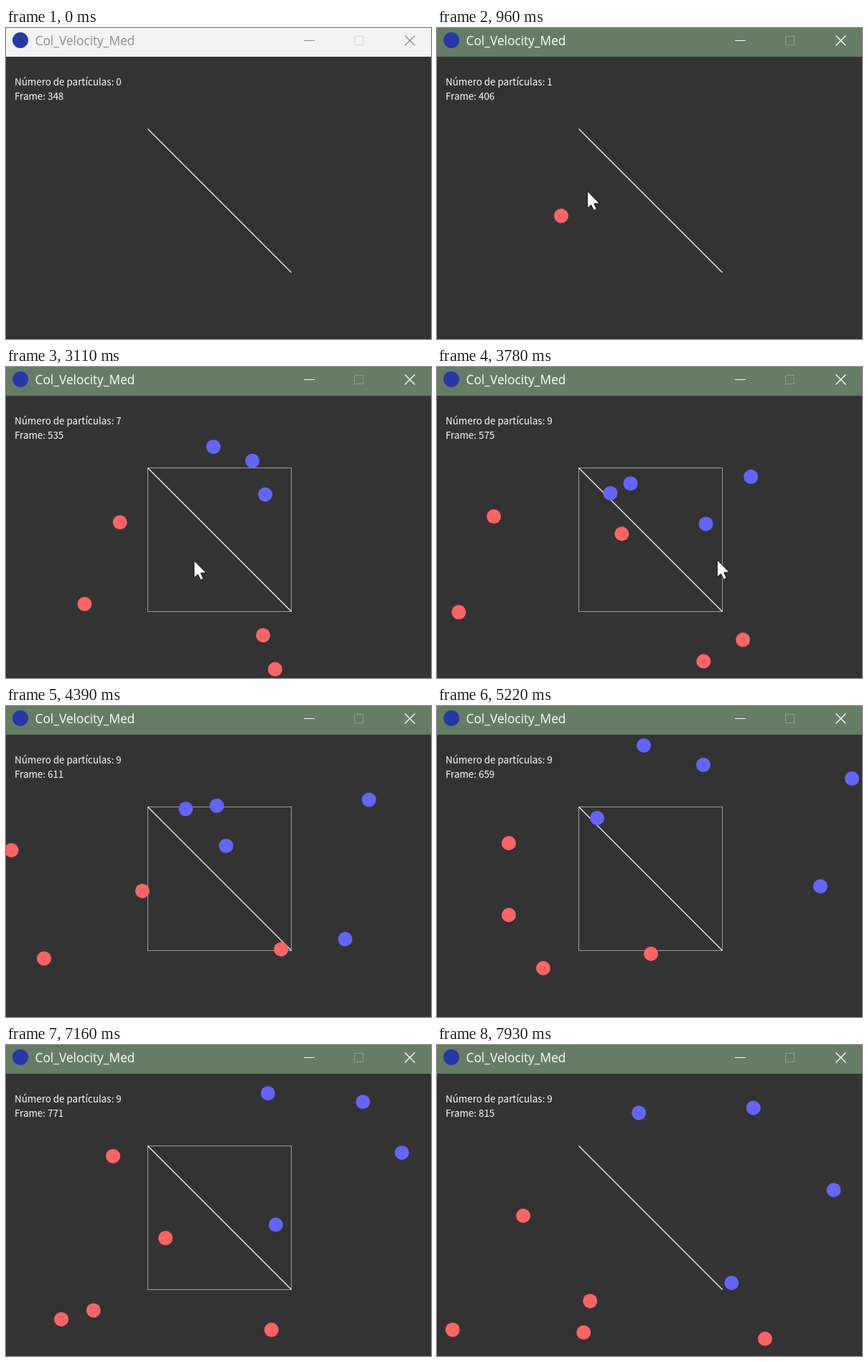
Recreate the animation shown at these times as an HTML page with a canvas. Size 592 by 433 pixels, loop 8000 ms.

```html
<!DOCTYPE html>
<html lang="pt">
<head>
<meta charset="utf-8">
<title>Col_Velocity_Med</title>
<style>
  html, body { margin: 0; width: 100%; height: 100%; overflow: hidden; background: #333; }
  canvas { display: block; }
</style>
</head>
<body>
<canvas id="stage" width="592" height="433"></canvas>
<script>
const ctx = document.getElementById('stage').getContext('2d');
const LOOP = 8000, SPEED = 2, RADIUS = 10, ANCHOR = 659, FOCUS = 390;
const WALL = { left: 6, right: 587.5, top: 49.6, bottom: 431 };
const BAR = { x1: 197.5, y1: 140.5, x2: 397.5, y2: 340.5, offset: 57, skin: 3 };

// Bursts of screen updates: start, end, count
const BURSTS = [
  [70, 800, 11], [880, 1650, 11], [1700, 2470, 12], [2540, 3310, 12], [3380, 4120, 12],
  [4190, 4950, 12], [5010, 5780, 12], [5850, 6610, 12], [6680, 7440, 12], [7510, 7930, 7]
];
// Time in ms against the sketch's frame counter
const CLOCK = [[0, 348], [1910, 464], [3100, 535], [4397, 611], [5220, 659], [6334, 723], [7930, 815]];

// Position and heading at ANCHOR, and the frame of birth
const particles = [
  [298, 345, 2.976, 390],
  [534, 251, -0.874, 408],
  [371, 82, -0.634, 430],
  [578, 101, -2.828, 441],
  [100, 191, -0.102, 475],
  [148, 365, 0.1415, 488],
  [288, 55, -1.168, 520],
  [100, 291, 2.784, 540],
  [223, 156, -1.907, 568]
].map(([x, y, angle, born]) => ({ x, y, angle, born }));

function interpolate(keys, at, ease = u => u) {
  if (at <= keys[0][0]) return keys[0].slice(1);
  for (let i = 1; i < keys.length; i++) {
    const a = keys[i - 1], b = keys[i];
    if (at <= b[0]) {
      const u = ease((at - a[0]) / (b[0] - a[0]));
      return a.slice(1).map((v, j) => v + (b[j + 1] - v) * u);
    }
  }
  return keys[keys.length - 1].slice(1);
}

function lastUpdate(t) {
  let tick = 0;
  for (const [start, end, count] of BURSTS) {
    if (t < start) break;
    const step = (end - start) / (count - 1);
    tick = start + step * Math.min(count - 1, Math.floor((t - start) / step));
  }
  return tick;
}

const gapOf = p => p.x - BAR.offset - p.y;

function advance(p) {
  const before = gapOf(p), side = Math.sign(before);
  p.x += p.vx;
  p.y += p.vy;
  const onBar = p.x > BAR.x1 && p.x < BAR.x2;
  if (onBar && before * side >= BAR.skin && gapOf(p) * side < BAR.skin) {
    const shift = BAR.offset + BAR.skin * side;
    [p.x, p.y] = [p.y + shift, p.x - shift];
    [p.vx, p.vy] = [p.vy, p.vx];
  }
  if (p.x < WALL.left && p.vx < 0) { p.x = 2 * WALL.left - p.x; p.vx *= -1; }
  if (p.x > WALL.right && p.vx > 0) { p.x = 2 * WALL.right - p.x; p.vx *= -1; }
  if (p.y < WALL.top && p.vy < 0) { p.y = 2 * WALL.top - p.y; p.vy *= -1; }
  if (p.y > WALL.bottom && p.vy > 0) { p.y = 2 * WALL.bottom - p.y; p.vy *= -1; }
}

// Runs forwards or backwards from the anchor
function place({ x, y, angle }, frame) {
  const v = frame < ANCHOR ? -SPEED : SPEED;
  const p = { x, y, vx: v * Math.cos(angle), vy: v * Math.sin(angle) };
  for (let n = Math.abs(frame - ANCHOR); n > 0; n--) advance(p);
  return p;
}

// The pointer visits every spot where a particle is born
const pointerPath = [
  [358, -25, 399], [464, 281, 199.5], [535, 262, 269.5], [592, 400, 445],
  ...particles.map(p => {
    const { x, y } = place(p, p.born);
    return [p.born, x, y];
  })
].sort((a, b) => a[0] - b[0]);

function stroke(color, width, ...segments) {
  ctx.strokeStyle = color;
  ctx.lineWidth = width;
  ctx.beginPath();
  for (const [x1, y1, x2, y2] of segments) {
    ctx.moveTo(x1, y1);
    ctx.lineTo(x2, y2);
  }
  ctx.stroke();
}

function disc(x, y, r, color) {
  ctx.fillStyle = color;
  ctx.beginPath();
  ctx.arc(x, y, r, 0, 2 * Math.PI);
  ctx.fill();
}

function text(str, x, y, font, color) {
  ctx.font = font;
  ctx.fillStyle = color;
  ctx.fillText(str, x, y);
}

function drawTitleBar(focused) {
  const ink = focused ? '#fff' : '#8e8e8e';
  ctx.fillStyle = focused ? '#647d64' : '#f3f3f3';
  ctx.fillRect(0, 0, 592, 40);
  disc(20, 17, 11, '#2638a8');
  text('Col_Velocity_Med', 40.5, 24, '17.3px "Open Sans", sans-serif', ink);
  stroke(ink, 1, [415, 17.5, 430, 17.5]);
  stroke(ink, 1.4, [555.5, 10.5, 569.5, 24.5], [569.5, 10.5, 555.5, 24.5]);
  ctx.strokeStyle = focused ? '#88a088' : '#dcdcdc';
  ctx.lineWidth = 1;
  ctx.strokeRect(485.5, 11.5, 12, 12);
}

function drawPointer(x, y) {
  const outline = [[0, 0], [0, 24], [5.2, 19.2], [9, 27], [13, 25.2], [9.4, 17.4], [17, 17.2]];
  ctx.beginPath();
  for (const [dx, dy] of outline) ctx.lineTo(x + dx, y + dy);
  ctx.closePath();
  ctx.fillStyle = '#fff';
  ctx.fill();
  ctx.strokeStyle = '#111';
  ctx.lineWidth = 1;
  ctx.stroke();
}

function draw(t) {
  const frame = Math.round(interpolate(CLOCK, lastUpdate(Math.min(t + 10, LOOP)))[0]);
  const live = particles.filter(p => frame >= p.born).map(p => place(p, frame));
  const near = live.some(p =>
    p.x + RADIUS > BAR.x1 && p.x - RADIUS < BAR.x2 &&
    p.y + RADIUS > BAR.y1 && p.y - RADIUS < BAR.y2);

  ctx.fillStyle = '#333';
  ctx.fillRect(0, 0, 592, 433);
  if (near) {
    ctx.strokeStyle = '#a0a0a0';
    ctx.lineWidth = 1;
    ctx.strokeRect(BAR.x1, BAR.y1, BAR.x2 - BAR.x1, BAR.y2 - BAR.y1);
  }
  stroke('#fff', 1.1, [BAR.x1, BAR.y1, BAR.x2, BAR.y2]);
  for (const p of live) disc(p.x, p.y, RADIUS, gapOf(p) > 0 ? '#6464ff' : '#ff6464');

  const font = '13.4px "Noto Sans CJK JP", "Noto Sans CJK SC", "Noto Sans CJK", "Noto Sans", sans-serif';
  text('Número de partículas: ' + live.length, 12, 80, font, '#fff');
  text('Frame: ' + frame, 12, 100, font, '#fff');
  drawTitleBar(frame >= FOCUS);

  const [x, y] = interpolate(pointerPath, frame, u => u * u * (3 - 2 * u));
  drawPointer(x, y);
}

const begin = performance.now();
function tick() {
  draw((performance.now() - begin) % LOOP);
  requestAnimationFrame(tick);
}
tick();
</script>
</body>
</html>
```
